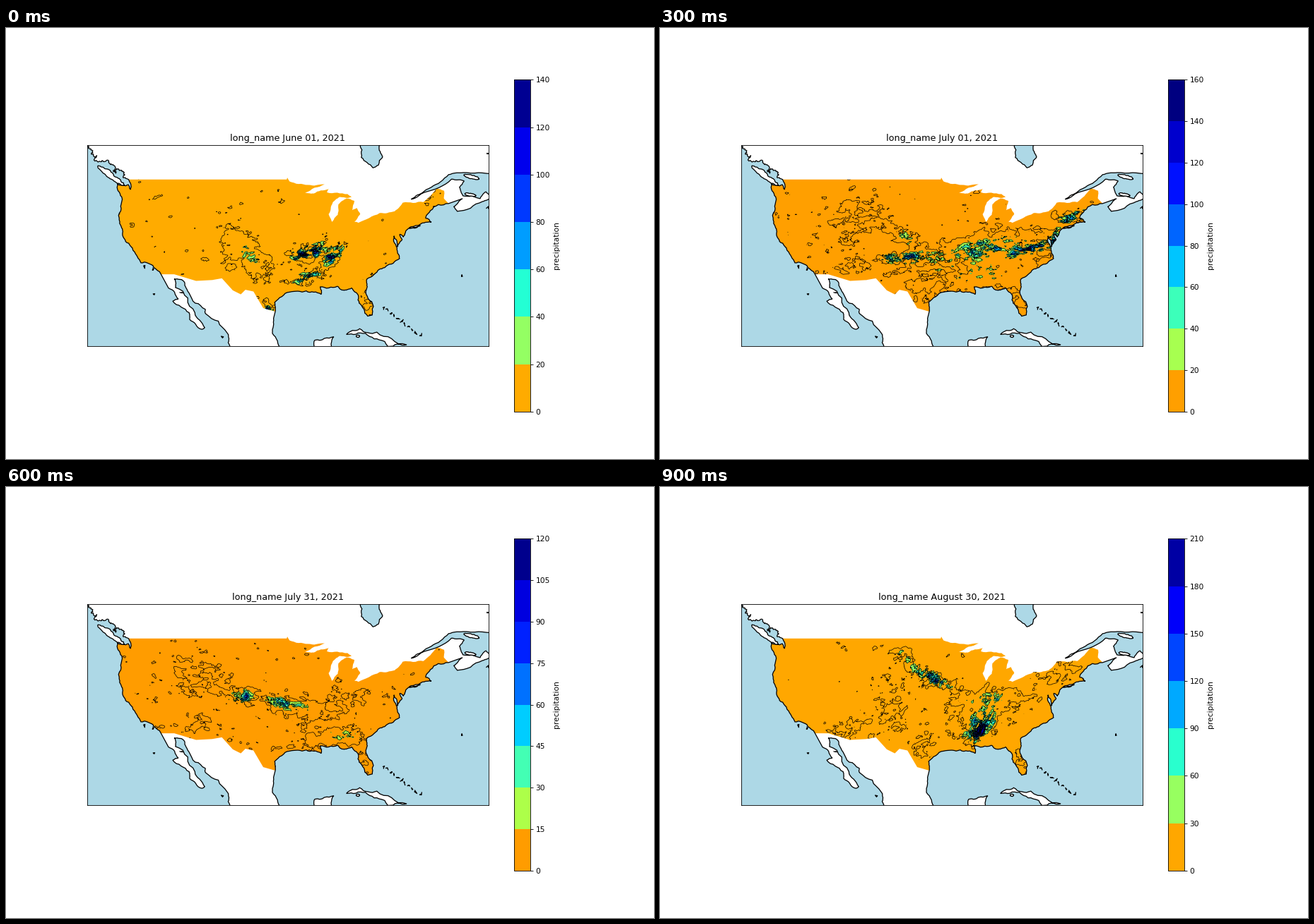
A matplotlib script that plays this animation: 917 by 611 pixels, repeating every 1 s.

```python
from collections import namedtuple
import matplotlib.pyplot as plt
import numpy as np
from matplotlib.animation import FuncAnimation
from matplotlib.colors import PowerNorm
from matplotlib.patches import Polygon
from matplotlib.ticker import MaxNLocator

W, H, DPI = 917, 611, 64
S = W / 12 / DPI  # scales point sizes to a 12 inch wide layout
plt.rcParams.update({
    "font.family": "DejaVu Sans", "font.size": 10 * S,
    "axes.titlepad": 6 * S, "axes.labelpad": 4 * S, "axes.linewidth": 0.8 * S,
    "ytick.major.size": 3.5 * S, "ytick.major.width": 0.8 * S,
    "ytick.major.pad": 3.5 * S,
})

# Key points of coasts and borders as (lon, lat); roughen() adds the detail
FJORDS = [(-130.5, 54.6), (-128.2, 52.2), (-125, 50.1), (-123.1, 49.2)]
WEST = [(-122.75, 49.05), (-122.4, 47.3), (-122.8, 48.15), (-124.7, 48.35), (-123.95, 46),
        (-124.5, 42.8), (-124.1, 41), (-123.8, 39.3), (-122.4, 37.4), (-121.9, 36.6),
        (-120.6, 34.5), (-118.5, 34), (-117.1, 32.5)]
BAJA = [(-115.8, 30.1), (-114.1, 28.2), (-115.05, 27.8), (-112.2, 25.8), (-112.1, 24.6),
        (-110, 22.9), (-109.5, 23.2), (-111.2, 25.8), (-114.6, 30.2), (-114.8, 31.7),
        (-113, 31.1), (-112.2, 29.2), (-109.4, 26.4), (-109.3, 25.6), (-105.6, 22.3),
        (-105.4, 20.6), (-105, 19.3)]
EAST_MEXICO = [(-96.2, 19.4), (-97.7, 22.2), (-97.5, 24.8)]
GULF = [(-97.2, 26), (-97.3, 27.6), (-94.7, 29.4), (-91.8, 29.6), (-89.2, 29), (-89.4, 30.3),
        (-86.4, 30.4), (-85.2, 29.7), (-83.9, 30.1), (-82.7, 28.7), (-82.6, 27.5), (-81.1, 25.2)]
ATLANTIC = [(-80.3, 25.4), (-80.1, 26.9), (-81.3, 29.9), (-81.2, 31.7), (-79, 33.4),
            (-77.9, 33.9), (-75.55, 35.25), (-76, 36.8), (-76.5, 39.2), (-75.9, 37.3),
            (-75.1, 38.6), (-75.5, 39.5), (-74.9, 39), (-74, 40.5), (-71.2, 41.5),
            (-70, 41.6), (-71, 42.3), (-70.2, 43.6), (-67, 44.85)]
MARITIME = [(-64.6, 45.7), (-66.1, 44.3), (-65.5, 43.5), (-61.1, 45.2), (-59.5, 45.9),
            (-60.5, 46.9), (-61.5, 45.7), (-64.5, 46.2), (-65.1, 47.7), (-64.3, 48.8),
            (-66.5, 49.1), (-71.2, 46.8), (-73.5, 45.6), (-70, 47.7), (-67, 49.9),
            (-64.5, 50.25), (-59, 50.2)]
SOUTH_BORDER = [(-114.8, 32.5), (-111, 31.35), (-108.2, 31.5), (-106.5, 31.8), (-104.6, 29.7),
                (-103.2, 29), (-102.4, 29.8), (-101, 29.5), (-99.3, 26.6)]
NORTH_BORDER = [(-67.8, 45.7), (-67.8, 47.1), (-69.1, 47.4), (-71.4, 45.1), (-75, 45),
                (-76.4, 43.5), (-79, 43.2), (-82.7, 41.5), (-83.4, 41.7), (-82.4, 43),
                (-83, 44.1), (-83.8, 43.7), (-83.4, 45.3), (-84.8, 45.75), (-86.2, 44.7),
                (-86.3, 42.9), (-87.3, 41.65), (-87.9, 43), (-87.2, 45), (-86, 46),
                (-83.9, 46), (-84.6, 46.5), (-88.2, 46.8), (-87.9, 47.4), (-90.5, 46.6),
                (-92, 46.75), (-88.6, 48.2), (-91.5, 48.1), (-94.7, 48.7), (-95.1, 49.4),
                (-95.2, 49.05)]
JAMES_BAY = [(-82.4, 55.5), (-82.2, 52.9), (-80.2, 51.1), (-79.2, 51.6), (-78.5, 53),
             (-79.1, 54.2), (-78.9, 55.5)]
CUBA = [(-84.8, 22), (-82.5, 23), (-79.5, 22.4), (-74.3, 20.2), (-77.5, 19.9), (-78.2, 20.8),
        (-81.5, 22.2)]
YUCATAN = [(-90.5, 19), (-90.3, 21), (-87, 21.6), (-87.4, 19)]
SPECKS = [(-64.7, 32.3), (-118.3, 29), (-113.4, 29.3), (-106.5, 21.6), (-119.9, 34),
          (-118.4, 33.4), (-60.1, 53.6), (-60.1, 44)]

# Areas of scattered light rain: lon, lat, half length, half width
AREAS = {
    "rockies": (-111, 42, 7, 5), "southwest": (-111, 34, 5, 2), "high plains": (-103.5, 37, 4, 6),
    "north": (-97, 46.3, 6, 2.3), "texas": (-98, 30.5, 3.5, 3.2), "gulf": (-91, 30.8, 7, 1.8),
    "southeast": (-84, 34.5, 7, 4.5), "midlands": (-87, 37.5, 9, 3), "lakes": (-90, 44, 4.5, 2.5),
    "northeast": (-74, 43, 6, 2.2), "florida": (-81.3, 27.8, 1.6, 3),
}
# A track of heavy rain: lon and lat of both ends, half width, strength in levels
Scene = namedtuple("Scene", "peak areas tracks")
SCENES = (
    Scene(135, "high plains,florida",
          [(-94, 35.3, -88.5, 37.4, 1.2, 4), (-88.3, 34.5, -85.8, 37.2, 1, 3.5),
           (-93.4, 31.5, -89.8, 32.2, 1, 3.2), (-104.5, 38.5, -99, 33.5, 1.4, .9),
           (-99, 27, -97.8, 26.3, .6, 4)]),
    Scene(155, "midlands,southeast,north,florida",
          [(-93, 33.7, -87, 35, 1.4, 3.5), (-88, 37, -79, 39, 1.3, 1.6),
           (-99, 46, -96, 48, 1, 2.6)]),
    Scene(193, "southeast,midlands,texas,northeast,florida",
          [(-91, 36, -79, 40.2, .7, 3.2), (-91, 33.8, -82, 35, 1.5, 1.5),
           (-99.5, 30, -92, 31.8, 1, 2.2), (-90, 30.4, -82.5, 30.6, .7, 4),
           (-77, 41.5, -68, 45.5, 1, .9)]),
    Scene(150, "rockies,southwest,texas,southeast,midlands,gulf,florida",
          [(-105, 35.2, -96, 35.6, 1, 3.2), (-94, 35.8, -80, 38.5, 1.6, 2.4),
           (-83, 35.8, -75.5, 38, .8, 4), (-76.5, 38, -74.8, 40, 1.5, 2.5),
           (-74.5, 41.9, -70, 43.2, .9, 3.3), (-104.7, 41, -98, 37, 1, 1.2),
           (-96, 33, -81, 32.5, 2.6, .9)]),
    Scene(136, "midlands,texas,northeast,florida",
          [(-96, 37.5, -88, 39.5, 1.3, 2.6), (-100, 30.5, -95, 31.5, 1.5, 1.6),
           (-86, 38, -78, 40, 1.5, 1.5)]),
    Scene(154, "rockies,north,gulf,southeast,texas,northeast,florida",
          [(-101, 28.8, -92.5, 30.8, 1.2, 1), (-86.5, 32, -82.5, 33.5, 1.8, 1),
           (-69.8, 45.8, -67.8, 46.8, .9, 1.2), (-98.8, 26.8, -97.4, 26.4, .6, 2.4)]),
    Scene(116, "rockies,southwest,midlands,gulf,florida",
          [(-99, 38.5, -91, 36.5, 1, 2.2), (-105, 39, -101, 39, 1.3, 2.2),
           (-90, 32, -82, 32, 1.2, 1.1)]),
    Scene(89, "southwest,southeast,midlands,lakes,gulf,northeast,florida",
          [(-93.5, 42, -88.5, 43.3, 1, 1.6), (-114.7, 32.9, -109.5, 32.6, .7, 1.8),
           (-90, 46.4, -83.3, 44.6, .9, 2), (-82, 39.9, -73.5, 44.3, .7, 1.6),
           (-86.5, 35.5, -77.5, 37, 4, .95), (-81.8, 30.5, -81.5, 26, 1, 1.4)]),
    Scene(290, "rockies,texas,southeast,northeast,florida",
          [(-96.6, 46, -94.8, 48.8, 1.3, 1.4), (-101.7, 48.8, -99.4, 48.5, .9, 2.8),
           (-95, 42.9, -93, 42.6, .6, 2.3), (-95.5, 39, -92.7, 37.9, .8, 2.3),
           (-89.3, 37.2, -87.2, 35.9, .6, 2.4), (-89, 31.5, -85.5, 31.8, 1, 1)]),
    Scene(208, "high plains,southwest,midlands,texas,northeast,florida",
          [(-89.9, 32, -86.2, 36.6, 2.1, 3), (-89.3, 31.7, -88, 34.5, 1, 3.5),
           (-99.8, 43.8, -93.2, 40.5, 1.1, 2.5), (-91, 38.2, -83, 39, 1.1, 1.3),
           (-103, 46.8, -100.5, 45.2, 1.2, .9)]),
)
MONTHS = {"June": 30, "July": 31, "August": 31}

CELL = 0.08
X, Y = np.meshgrid(np.arange(-125.2, -66, CELL), np.arange(24.4, 49.8, CELL))
coast_rng = np.random.default_rng(4)


def roughen(points, amount=0.14, rounds=3):
    """Insert displaced midpoints so that a coarse line looks natural."""
    line = np.array(points, float)
    for _ in range(rounds):
        span = np.diff(line, axis=0)
        shift = coast_rng.uniform(-amount, amount, (len(span), 1))
        middle = line[:-1] + span / 2 + shift * span[:, ::-1] * [-1, 1]
        finer = np.empty((2 * len(line) - 1, 2))
        finer[::2], finer[1::2] = line, middle
        line = finer
    return line


def rotate(x, y, angle):
    c, s = np.cos(angle), np.sin(angle)
    return x * c + y * s, y * c - x * s


def ellipse(lon, lat, length, width, degrees):
    a = np.linspace(0, 2 * np.pi, 13)
    x, y = rotate(length * np.cos(a), width * np.sin(a), -np.radians(degrees))
    return np.column_stack([lon + x, lat + y])


def noise(rng, scale, stretch, angle, power):
    """Smooth random field with unit deviation, drawn out along the angle."""
    kx, ky = np.meshgrid(*(2 * np.pi * np.fft.fftfreq(n, CELL) for n in X.shape[::-1]))
    u, v = rotate(kx, ky, angle)
    spectrum = (1 + scale**2 * ((stretch * u)**2 + v**2))**-power
    field = np.fft.ifft2(np.fft.fft2(rng.standard_normal(X.shape)) * spectrum).real
    return (field - field.mean()) / field.std()


def bump(lon, lat, length, width, angle):
    u, v = rotate(X - lon, Y - lat, angle)
    return np.exp(-((u / length)**2 + (v / width)**2)**1.5)


def track_bump(track, spread=1):
    x0, y0, x1, y1, width, _ = track
    length = np.hypot(x1 - x0, y1 - y0) / 2 + width / 3
    return bump((x0 + x1) / 2, (y0 + y1) / 2, length * spread, width * spread,
                np.arctan2(y1 - y0, x1 - x0))


def date_of(frame):
    day = 1 + 10 * frame
    for month, days in MONTHS.items():
        if day <= days:
            return f"{month} {day:02d}, 2021"
        day -= days


def add_shape(points, fill, edge="none", z=1):
    return ax.add_patch(Polygon(points, facecolor=fill, edgecolor=edge,
                                linewidth=1.2 * S, zorder=z))


fig = plt.figure(figsize=(W / DPI, H / DPI), dpi=DPI, facecolor="white")
map_height = 0.62 * W / 2 / H
ax = fig.add_axes([0.125, 0.495 - map_height / 2, 0.62, map_height], facecolor="lightblue")
ax.set(xlim=(-130, -60), ylim=(20, 55), xticks=[], yticks=[])
for spine in ax.spines.values():
    spine.set_zorder(9)

west, gulf, atlantic = roughen(WEST), roughen(GULF), roughen(ATLANTIC)
land = np.concatenate([roughen(FJORDS, 0.5, 5), west, roughen(BAJA), roughen(EAST_MEXICO, 0.08),
                       gulf, atlantic, roughen(MARITIME, 0.08), [(-59, 57), (-131, 57)]])
country = np.concatenate([west, SOUTH_BORDER, gulf, atlantic, roughen(NORTH_BORDER, 0.08)])
add_shape(land, "white")
add_shape(land, "none", "black", 5)
add_shape(roughen(JAMES_BAY), "lightblue", "black", 5)
for island in (CUBA + CUBA[:1], YUCATAN, ellipse(-125.8, 49.7, 2.9, 0.5, -36),
               ellipse(-63, 49.5, 1.4, 0.3, -15), ellipse(-63.2, 46.4, 1, 0.25, -10),
               ellipse(-72.9, 40.8, 1, 0.12, 12), ellipse(-82.8, 21.7, 0.3, 0.2, 0)):
    add_shape(roughen(island), "white", "black", 5)
bahamas = [(-78.4 + 6.4 * t, 26.7 - 4.9 * t) for t in np.linspace(0, 1, 11)]
for lon, lat in SPECKS + bahamas:
    scribble = (lon, lat) + coast_rng.normal(0, 0.18, (4, 2))
    ax.plot(*scribble.T, color="black", lw=1.2 * S, zorder=5)
clip = add_shape(country, "none")
drawn = []


def update(frame):
    while drawn:
        drawn.pop().remove()
    scene = SCENES[frame]
    rng = np.random.default_rng(20 + frame)
    levels = MaxNLocator(8, min_n_ticks=1,
                         steps=[1, 1.5, 2, 2.5, 3, 4, 5, 6, 8, 10]).tick_values(0, scene.peak)
    x0, y0, x1, y1 = scene.tracks[0][:4]
    wind = np.arctan2(y1 - y0, x1 - x0)

    texture = np.clip(0.45 + 0.55 * noise(rng, 0.22, 2, wind, 0.95), 0, None)
    rain = levels[1] * texture * sum(t[-1] * track_bump(t) for t in scene.tracks)
    rain = np.minimum(rain, scene.peak)
    damp = noise(rng, 0.3, 1.5, wind / 2, 1.05) - 2.5
    damp += 2.2 * np.maximum.reduce([bump(*AREAS[a], 0.15) for a in scene.areas.split(",")])
    damp += 3 * np.maximum.reduce([track_bump(t, 1.6) for t in scene.tracks])

    fill = ax.contourf(X, Y, rain, levels=levels, cmap="jet_r", zorder=2,
                       norm=PowerNorm(0.5, 0, scene.peak))
    line = dict(colors="black", linewidths=0.65 * S, zorder=3)
    edges = [ax.contour(X, Y, damp, levels=[0], **line),
             ax.contour(X, Y, rain, levels=levels[1:-1], **line)]
    for layer in (fill, *edges):
        layer.set_clip_path(clip)
    bar_ax = fig.add_axes([0.78375, 0.11, 0.77 * 8 / 20 / 12, 0.77])
    fig.colorbar(fill, cax=bar_ax, ticks=levels, label="precipitation")
    ax.set_title(f"long_name {date_of(frame)}")
    drawn.extend([fill, *edges, bar_ax])
    return drawn


anim = FuncAnimation(fig, update, frames=len(SCENES), interval=100, repeat=True)
plt.show()
```
